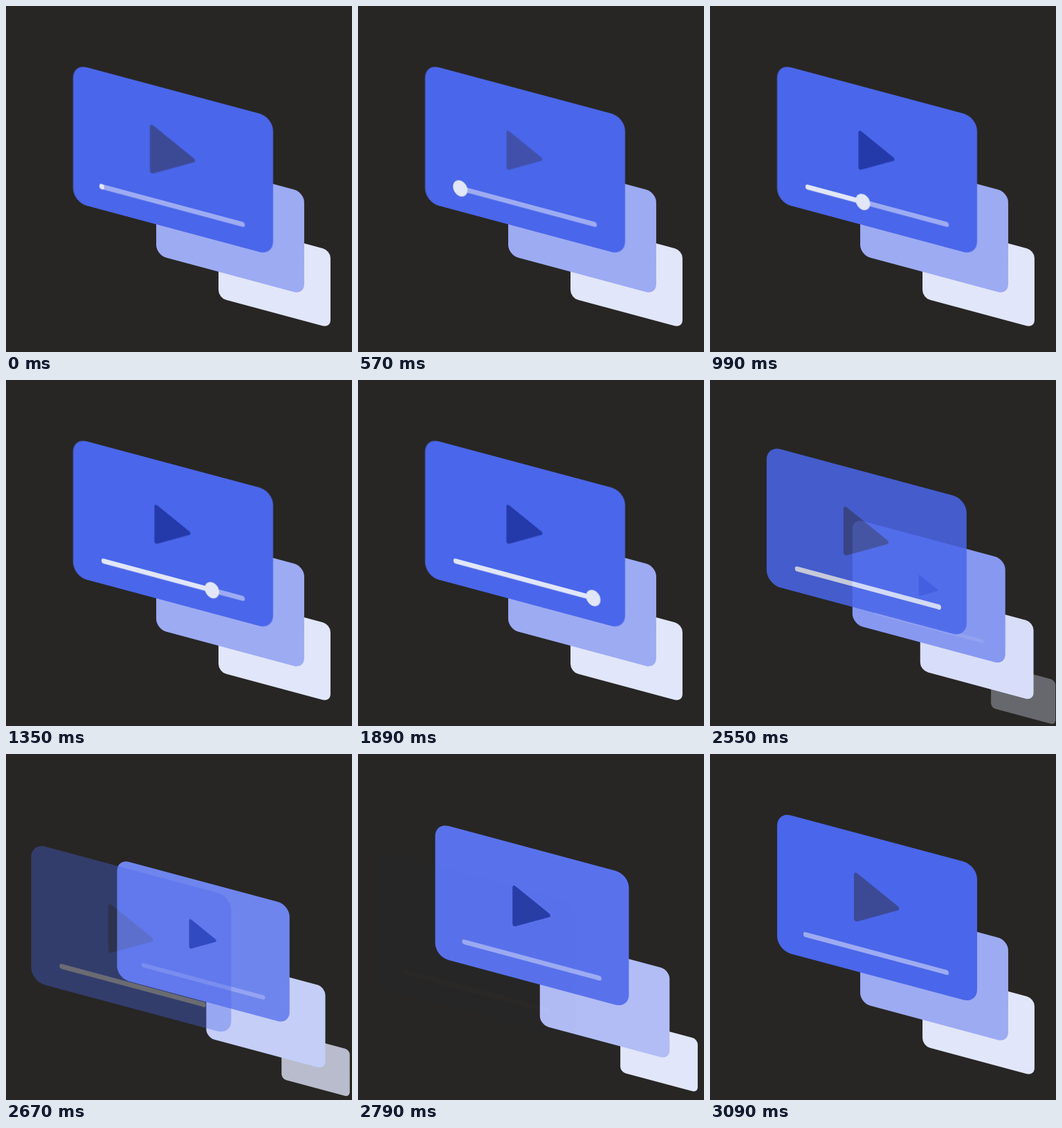
An HTML page that plays this animation: 500 px wide and 500 px high, repeating every 3240 ms.

```html
<!DOCTYPE html>
<html lang="en">
<head>
<meta charset="utf-8">
<title>Video cards</title>
<style>
  html, body { margin: 0; width: 100%; height: 100%; overflow: hidden; background: #272624; }
  svg { display: block; width: 100%; height: 100%; }
</style>
</head>
<body>
<svg id="stage" viewBox="0 0 500 500"></svg>
<script>
const LOOP = 3240;
const BAR_Y = 66.7;
const BAR_LEFT = -103;
const BAR_RIGHT = 100;
const FILL_LEFT = -100;
const FILL_RIGHT = 104;

const BLUE = [74, 102, 234];
const SOFT = [157, 171, 243];
const PALE = [225, 230, 250];
const NAVY = [36, 58, 170];
const DUSK = [60, 74, 150];
const DUSK_LIGHT = [65, 81, 171];

// Resting places from front to back
const slots = [
  { x: 241.5, y: 222, s: 1, color: BLUE },
  { x: 324, y: 314.5, s: 0.74, color: SOFT },
  { x: 388, y: 387.5, s: 0.56, color: PALE },
  { x: 453.7, y: 454.9, s: 0.318, color: PALE }
];

const clamp = v => Math.min(1, Math.max(0, v));
const lerp = (a, b, p) => a + (b - a) * p;
const span = (t, start, end) => clamp((t - start) / (end - start));
const smooth = (t, start, end) => {
  const u = span(t, start, end);
  return u * u * (3 - 2 * u);
};
const mix = (a, b, p) => a.map((v, i) => lerp(v, b[i], p));
const rgb = c => `rgb(${c.map(Math.round).join(",")})`;

// Cubic bezier easing with flat ends; x1 and x2 are the handle times
function ease(u, x1, x2) {
  let low = 0, high = 1;
  for (let i = 0; i < 24; i++) {
    const m = (low + high) / 2, n = 1 - m;
    if (3 * x1 * m * n * n + 3 * x2 * m * m * n + m ** 3 < u) low = m;
    else high = m;
  }
  return low * low * (3 - 2 * low);
}

const stage = document.getElementById("stage");

function add(parent, tag, attrs = {}) {
  const el = document.createElementNS("http://www.w3.org/2000/svg", tag);
  set(el, attrs);
  parent.append(el);
  return el;
}

function set(el, attrs) {
  for (const name in attrs) el.setAttribute(name, attrs[name]);
}

function makeCard() {
  const group = add(stage, "g");
  const face = add(group, "rect", { x: -144.5, y: -100, width: 289, height: 200, rx: 20 });
  return { group, face };
}

function makeControls(card) {
  const group = add(card.group, "g");
  const line = color => add(group, "line", {
    y1: BAR_Y, y2: BAR_Y, stroke: rgb(color), "stroke-width": 7.2, "stroke-linecap": "round"
  });
  return {
    group,
    play: add(group, "path", {
      d: "M-29 -31.5V31.5L29 0Z", "stroke-width": 7, "stroke-linejoin": "round"
    }),
    base: line(SOFT),
    fill: line(PALE),
    dot: add(group, "ellipse", { cy: BAR_Y, fill: rgb(PALE) })
  };
}

const cards = slots.map(makeCard).reverse();
stage.append(...cards.map(c => c.group).reverse());
const frontControls = makeControls(cards[0]);
const nextControls = makeControls(cards[1]);

function placeCard(card, { x, y, s, color }, opacity = 1) {
  set(card.group, { transform: `translate(${x} ${y}) skewY(15) scale(${s})`, opacity });
  set(card.face, { fill: rgb(color) });
}

function between(from, to, p, colorP) {
  return {
    x: lerp(from.x, to.x, p),
    y: lerp(from.y, to.y, p),
    s: lerp(from.s, to.s, p),
    color: mix(from.color, to.color, colorP)
  };
}

function drawLine(line, x1, x2) {
  set(line, { x1, x2, visibility: x2 > x1 ? "visible" : "hidden" });
}

function drawPlay(play, scale, color) {
  set(play, {
    transform: `translate(-1 -7) scale(${scale})`, fill: rgb(color), stroke: rgb(color)
  });
}

function drawFront(t) {
  const leave = ease(span(t, 2439, 2770), 0.5, 0.5);
  const home = slots[0];
  placeCard(cards[0], { ...home, x: home.x - 72 * leave, y: home.y + 53.7 * leave },
    1 - smooth(t, 2468, 2811));

  const { play, base, fill, dot } = frontControls;
  const finish = smooth(t, 2000, 2350);
  const dotX = lerp(lerp(BAR_LEFT, 98.5, smooth(t, 395, 1752)), FILL_RIGHT, finish);
  const radius = lerp(lerp(3.5, 10.4, smooth(t, 90, 480)), 3.4, finish);
  drawLine(base, dotX, BAR_RIGHT);
  drawLine(fill, FILL_LEFT, dotX);
  set(dot, { cx: dotX, rx: radius, ry: radius * 1.1 });

  const release = smooth(t, 2100, 2430);
  const pressed = mix(mix(DUSK, DUSK_LIGHT, smooth(t, 120, 560)), NAVY, smooth(t, 580, 850));
  drawPlay(play, 1 - 0.2 * (smooth(t, 120, 560) - release), mix(pressed, DUSK, release));
}

function drawNext(t) {
  const move = ease(span(t, 2437, 2919), 0.5, 0.5);
  placeCard(cards[1], between(slots[1], slots[0], move, span(t, 2426, 2870)));

  const { group, play, base, fill, dot } = nextControls;
  set(group, { opacity: span(t, 2445, 2540) });
  drawPlay(play, lerp(0.5, 1, smooth(t, 2440, 2970)), mix(NAVY, DUSK, smooth(t, 2690, 3060)));
  drawLine(base, lerp(FILL_LEFT, BAR_LEFT, smooth(t, 2700, 3000)), BAR_RIGHT);
  set(base, { opacity: lerp(0.5, 1, span(t, 2540, 2740)) });
  drawLine(fill, 0, 0);
  set(dot, { rx: 0, ry: 0 });
}

function draw(t) {
  drawFront(t);
  drawNext(t);
  placeCard(cards[2], between(slots[2], slots[1],
    ease(span(t, 2450, 3090), 0.5, 0.6), span(t, 2494, 2922)));
  placeCard(cards[3], between(slots[3], slots[2],
    ease(span(t, 2450, 3090), 0.75, 0.65), 0), span(t, 2458, 2730));
}

const start = performance.now();
function tick() {
  draw((performance.now() - start) % LOOP);
  requestAnimationFrame(tick);
}
tick();
</script>
</body>
</html>
```
